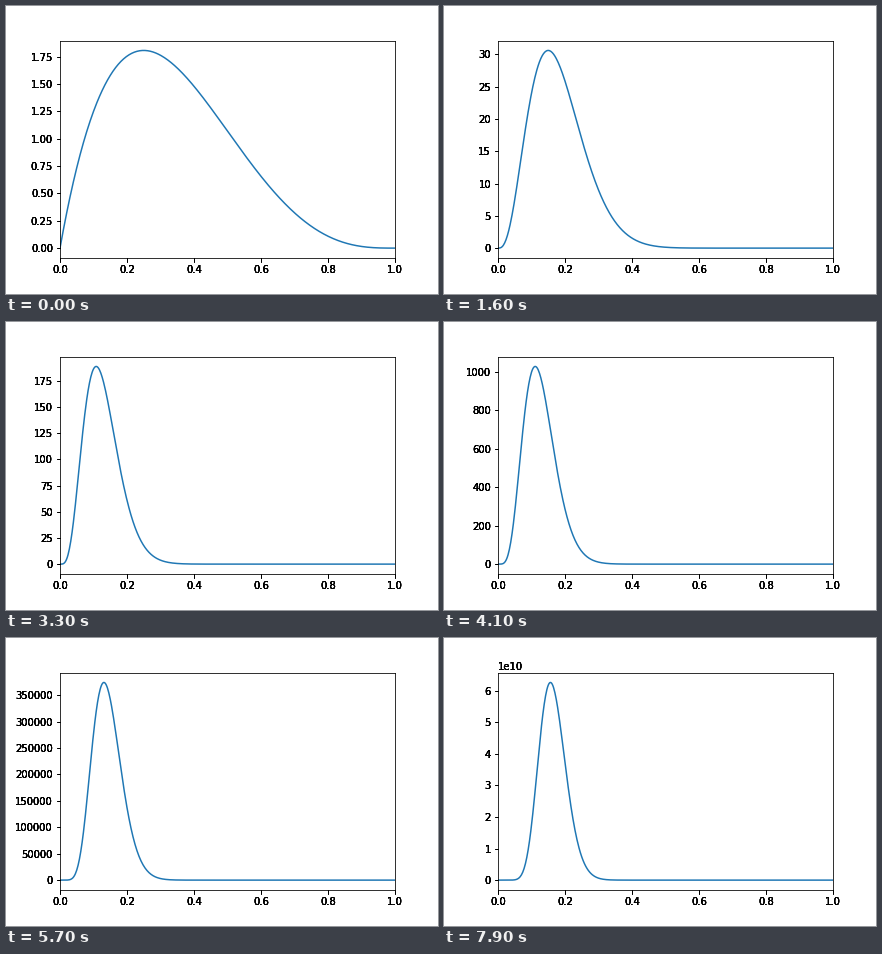
A matplotlib script for the animation above (8000 ms loop, 432 by 288 pixels).

```python
from math import factorial

import numpy as np
import matplotlib.pyplot as plt
from matplotlib.animation import FuncAnimation
from matplotlib.axes import Axes

FRAMES = 80
INTERVAL = 100
START_TRIALS = 4
START_HITS = 1
HIT_STEPS = np.array([5, 16, 19, 37, 42, 47, 53, 64, 65, 70, 74, 78])

plt.rcParams.update({"font.family": "DejaVu Sans", "font.size": 10})


class HeavyAxes(Axes):
    """Axes whose ticks and labels are drawn repeatedly for hard, dark edges."""

    def draw(self, renderer):
        super().draw(renderer)
        for _ in range(4):
            self.xaxis.draw(renderer)
            self.yaxis.draw(renderer)


def density(p, n, k):
    scale = factorial(n + 1) / (factorial(k) + factorial(n - k))
    return scale * p**k * (1 - p) ** (n - k)


fig = plt.figure(figsize=(6, 4), dpi=72, facecolor="white")
ax = fig.add_axes(HeavyAxes(fig, [0.125, 0.125, 0.775, 0.755]))
ax.set_xlim(0, 1)

p = np.linspace(0, 1, 501)
(curve,) = ax.plot(p, np.zeros_like(p), color="C0", lw=1.5)


def update(step):
    n = START_TRIALS + step
    k = START_HITS + int(np.sum(HIT_STEPS <= step))
    curve.set_ydata(density(p, n, k))
    peak = density(k / n, n, k)
    ax.set_ylim(-0.05 * peak, 1.05 * peak)
    return (curve,)


anim = FuncAnimation(fig, update, frames=FRAMES, interval=INTERVAL,
                     init_func=lambda: update(0), repeat=True,
                     repeat_delay=0, blit=False)
plt.show()
```
